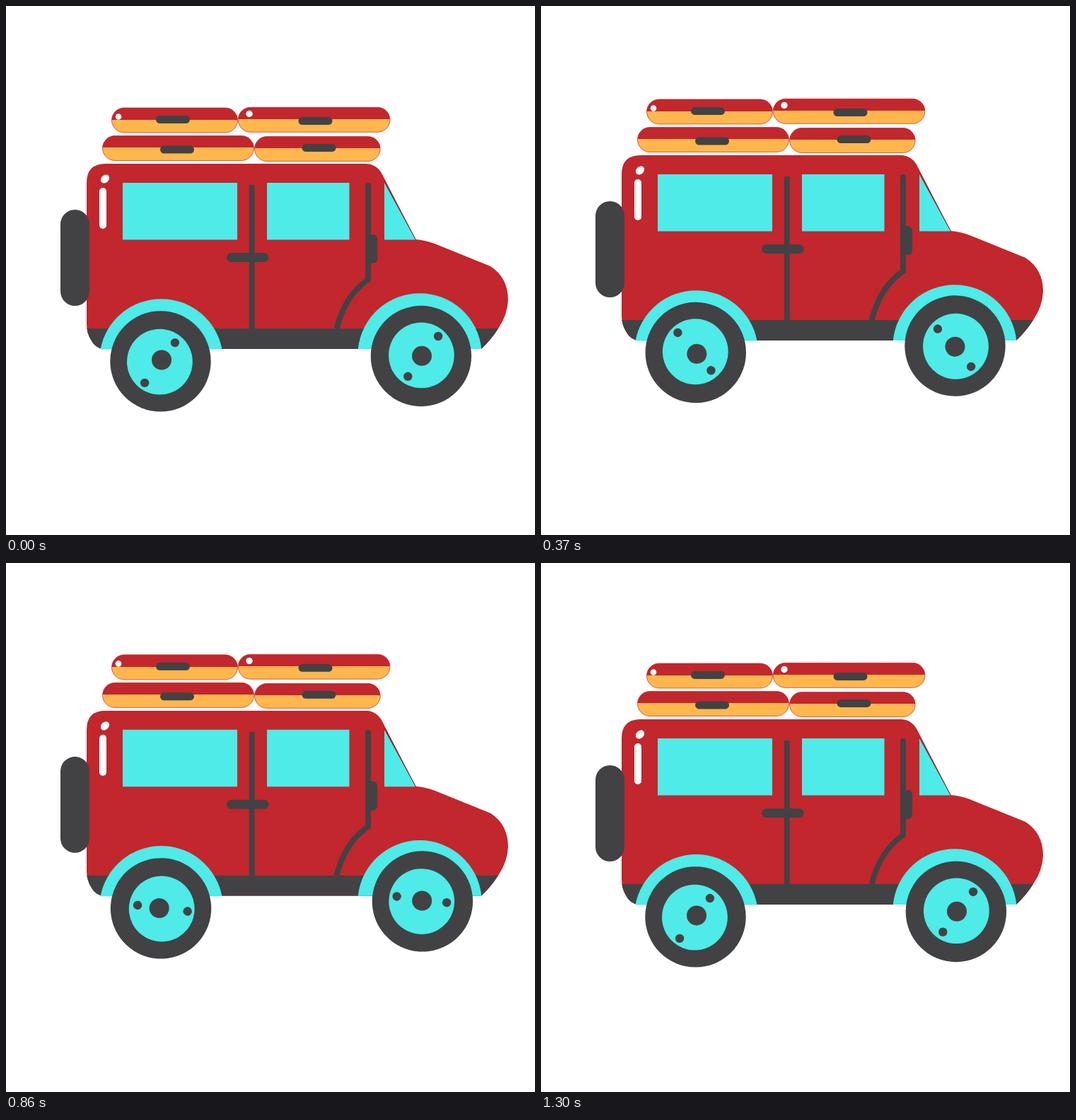
An HTML page for the animation above (1340 ms loop, 748 by 748 pixels).

```html
<!DOCTYPE html>
<html lang="en">
<head>
<meta charset="utf-8">
<title>Bouncing car</title>
<style>
html, body { margin: 0; width: 100%; height: 100%; overflow: hidden; background: #fff; }
svg { display: block; width: 100vw; height: 100vh; }
.red { fill: #c1272d; }
.dark { fill: #424244; }
.glass { fill: #4eebe8; }
.shine { fill: #fff; }
.seam { fill: none; stroke: #424244; stroke-width: 7.8; }
.board { fill: url(#board); stroke: #c1272d; stroke-width: .7; }
</style>
</head>
<body>
<svg viewBox="0 0 748 748">
  <defs>
    <linearGradient id="board" x2="0" y2="1">
      <stop offset=".48" stop-color="#c1272d"/>
      <stop offset=".48" stop-color="#ffb74d"/>
    </linearGradient>
    <clipPath id="shell">
      <path d="M114 250Q114 223 141 223H508Q525 223 533 240L579.500 330Q592 331 606 336L685 368Q710 384 710 416Q709 437 696 456Q686 472 672 485H138Q126 484 120 472Q114 462 114 450Z"/>
    </clipPath>
  </defs>
  <g id="car">
    <g id="luggage"></g>
    <g clip-path="url(#shell)">
      <rect class="red" x="110" y="220" width="605" height="270"/>
      <rect class="dark" x="110" y="456" width="605" height="30"/>
    </g>
    <rect class="dark" x="77" y="288" width="41" height="136" rx="20.500"/>
    <path class="glass" d="M165 250H327V330.500H165ZM369 250H485.500V330.500H369ZM535 250L579 330.500H535Z"/>
    <path d="M535 248L579.500 330.500" stroke="#424244" stroke-width=".9"/>
    <path class="seam" d="M347.700 253V457"/>
    <path class="seam" d="M512 254V387Q480 408 467.500 456" stroke-linejoin="round"/>
    <circle class="dark" cx="512" cy="254" r="3.900"/>
    <rect class="dark" x="312" y="349" width="59.500" height="13" rx="6.500"/>
    <rect class="dark" x="508" y="323" width="17" height="41" rx="6"/>
    <rect class="shine" x="132" y="257" width="10" height="58" rx="5"/>
    <ellipse class="shine" cx="140" cy="244.500" rx="6.800" ry="5.300" transform="rotate(-45 140 244.500)"/>
    <path class="glass" d="M133.500 485.500A87.500 87.500 0 0 1 305.500 485.500ZM497.800 485A87.700 87.700 0 0 1 672.300 485Z"/>
    <g id="wheels"></g>
  </g>
</svg>
<script>
const $ = id => document.getElementById(id);

// x, y, width, then handle x and y
const boards = [
  [149.5, 144, 178, 212, 155],
  [328.2, 143.3, 214.8, 413.5, 157],
  [136.5, 183.5, 214, 218, 197.5],
  [351.5, 184.5, 177.7, 418.5, 195]
];
$('luggage').innerHTML = boards.map(([x, y, w, hx, hy]) =>
  `<rect class="board" x="${x}" y="${y}" width="${w}" height="35" rx="17.5"/>
   <rect class="dark" x="${hx}" y="${hy}" width="48" height="11" rx="5.5"/>`
).join('') +
  '<circle class="shine" cx="159" cy="156.5" r="4.300"/><circle class="shine" cx="344" cy="152.500" r="4.700"/>';

// Each wheel turns about its axle; its parts sit slightly off centre
const wheels = [
  { axle: [218.8, 502.3], tyre: [-.3, .1], rim: [-1.4, .8], hub: [1.2, -1.8], bolts: [-1.3, 2.2] },
  { axle: [587.2, 493.2], tyre: [-.3, 1.8], rim: [.2, .7], hub: [.8, 1.6], bolts: [2.5, 2.2] }
];
const disc = (cls, [x, y], r) => `<circle class="${cls}" cx="${x}" cy="${y}" r="${r}"/>`;
$('wheels').innerHTML = wheels.map(({ tyre, rim, hub, bolts: [x, y] }) => '<g>' +
  disc('dark', tyre, 71.2) + disc('glass', rim, 46.4) + disc('dark', hub, 14) +
  disc('dark', [x + 21.4, y - 28.4], 6.2) + disc('dark', [x - 21.4, y + 28.4], 6.2) +
  '</g>').join('');

const LOOP = 1340, STEPS = 40;
const stepStart = k => 10 * (k < 20 ? Math.round(k * 10 / 3) : Math.floor(k * 10 / 3));

function draw(now) {
  const t = now % LOOP;
  let k = STEPS - 1;
  while (k > 0 && stepStart(k) > t) k--;

  const lift = Math.min(1.09 * k, .93 * (41.2 - k));
  $('car').setAttribute('transform', `translate(0 ${-lift})`);
  wheels.forEach(({ axle }, i) => $('wheels').children[i].setAttribute('transform',
    `translate(${axle}) rotate(${k * 360 / (STEPS - 1)})`));
}

let start;
function tick(now) {
  start ??= now;
  draw(now - start);
  requestAnimationFrame(tick);
}
draw(0);
requestAnimationFrame(tick);
</script>
</body>
</html>
```
